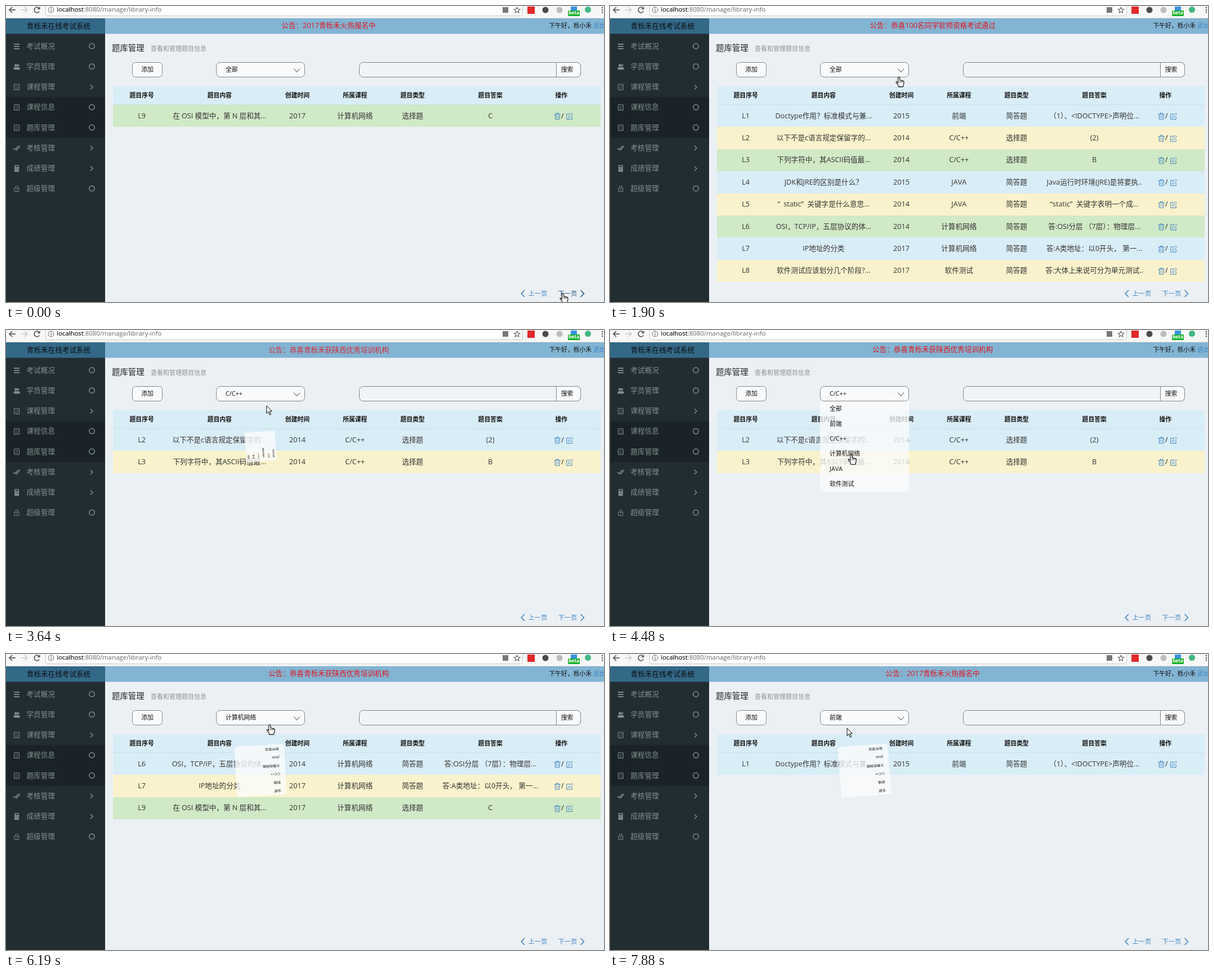
These frames come from a looping animation (1062 px wide and 527 px high, 8000 ms). An HTML page with a canvas:

```html
<!DOCTYPE html>
<html lang="zh-CN">
<head>
<meta charset="utf-8">
<title>题库管理</title>
<style>
html, body { margin: 0; width: 100%; height: 100%; overflow: hidden; background: #ebf0f4; }
canvas { display: block; width: 1062px; height: 527px; }
</style>
</head>
<body>
<canvas id="stage" width="1062" height="527"></canvas>
<script>
const ctx = document.getElementById('stage').getContext('2d');
const LOOP = 8000;
const FONT = '"Open Sans", "Noto Sans CJK JP", "Noto Sans CJK SC", sans-serif';
const BLUE = '#3f83c1', HOVER = '#23527c', PANEL = '#f8fafb', BORDER = '#858585', MENU_INK = '#82908f';
const SIDEBAR = 176, TABLE = { x: 190, y: 143, w: 866, head: 33, row: 39.4 };
const SELECT = { x: 373, y: 100, w: 158, h: 27 };
const LIST = { x: 373, y: 127, w: 158, h: 161 };
const PAGER = { x: 913, y: 504, w: 115, h: 16 };

const COLUMNS = [
  ['题目序号', 102.3], ['题目内容', 174], ['创建时间', 102.3], ['所属课程', 102.3],
  ['题目类型', 102.3], ['题目答案', 174], ['操作', 78]
];
const QUESTIONS = [
  ['L1', 'Doctype作用？标准模式与兼...', '2015', '前端', '简答题', '（1）、<!DOCTYPE>声明位...'],
  ['L2', '以下不是c语言规定保留字的...', '2014', 'C/C++', '选择题', '(2)'],
  ['L3', '下列字符中，其ASCII码值最...', '2014', 'C/C++', '选择题', 'B'],
  ['L4', 'JDK和JRE的区别是什么？', '2015', 'JAVA', '简答题', 'Java运行时环境(JRE)是将要执..'],
  ['L5', '”  static”  关键字是什么意思...', '2014', 'JAVA', '简答题', '“static”  关键字表明一个成...'],
  ['L6', 'OSI，TCP/IP，五层协议的体...', '2014', '计算机网络', '简答题', '答:OSI分层 （7层）：物理层...'],
  ['L7', 'IP地址的分类', '2017', '计算机网络', '简答题', '答:A类地址：以0开头， 第一...'],
  ['L8', '软件测试应该划分几个阶段?...', '2017', '软件测试', '简答题', '答:大体上来说可分为单元测试..'],
  ['L9', '在 OSI 模型中，第 N 层和其...', '2017', '计算机网络', '选择题', 'C']
];
const PAGE_SIZE = 8;
const ROW_COLORS = ['#d9edf7', '#faf2cc', '#d0e9c6'];
const OPTIONS = ['全部', '前端', 'C/C++', '计算机网络', 'JAVA', '软件测试'];
const MENU = [
  ['考试概况', 'bars'], ['学员管理', 'people'], ['课程管理', 'list', true], ['课程信息', 'list'],
  ['题库管理', 'list'], ['考核管理', 'checks', true], ['成绩管理', 'calculator', true], ['超级管理', 'lock']
];
const NOTICES = ['公告：2017青栎禾火热报名中', '公告：恭喜100名同学软师资格考试通过', '公告：恭喜青栎禾获陕西优秀培训机构'];
const NOTICE_PERIOD = 3195, NOTICE_LEAD = 3055;

// Each round clicks the select, then picks an option from the list.
const PAGE_BACK = 850;
const ROUNDS = [
  { open: 2200, from: [510, 124], pick: 2980, option: 2, x: 416 },
  { open: 3567, from: [468, 120], pick: 4580, option: 3, x: 428 },
  { open: 6057, from: [493, 110], pick: 6960, option: 1, x: 403 },
  { open: 7746, from: [410, 118], pick: 8700, option: 1, x: 450 }
];
const optionY = i => 141 + i * 26.75;

// Pointer moves: departure, arrival, destination.
const MOVES = [
  [0, 1, [989, 512]],
  [150, 570, [924, 517]],
  ...ROUNDS.flatMap((round, i) => [
    [i ? ROUNDS[i - 1].pick : PAGE_BACK, round.open - 200, round.from],
    [round.open, round.pick, [round.x, optionY(round.option) + 2]]
  ])
];

const easeOut = p => 1 - (1 - Math.min(1, Math.max(0, p))) ** 2;
const inside = (x, y, r) => x > r.x && x < r.x + r.w && y >= r.y && y < r.y + r.h;

function text(str, x, y, size, color = '#222', align = 'left', weight = '') {
  ctx.font = `${weight} ${size}px ${FONT}`;
  ctx.fontKerning = 'none';
  ctx.fillStyle = color;
  ctx.textAlign = align;
  ctx.textBaseline = 'middle';
  ctx.fillText(str, x, y);
}
function rect(x, y, w, h, color) {
  ctx.fillStyle = color;
  ctx.fillRect(x, y, w, h);
}
function finish(stroke, fill, width = 1) {
  if (fill) { ctx.fillStyle = fill; ctx.fill(); }
  if (stroke) { ctx.strokeStyle = stroke; ctx.lineWidth = width; ctx.stroke(); }
}
function line(points, stroke, width, fill) {
  ctx.beginPath();
  points.forEach(([x, y]) => ctx.lineTo(x, y));
  if (fill) ctx.closePath();
  finish(stroke, fill, width);
}
function circle(x, y, r, stroke, fill, width) {
  ctx.beginPath();
  ctx.arc(x, y, r, 0, Math.PI * 2);
  finish(stroke, fill, width);
}
function box(x, y, w, h, r, stroke, fill) {
  ctx.beginPath();
  ctx.roundRect(x, y, w, h, r);
  finish(stroke, fill);
}
function chevron(x, y, dir, size, color, width) {
  const back = x - dir * size / 2;
  line([[back, y - size], [back + dir * size, y], [back, y + size]], color, width);
}
function at(x, y, draw) {
  ctx.save();
  ctx.translate(x, y);
  draw();
  ctx.restore();
}

function drawBrowserBar() {
  rect(0, 0, 1062, 22, '#f7f7f7');
  box(70.5, -6, 847, 23.5, 3, '#c4c4c4', '#fff');
  rect(0, 21, 1062, 1, '#dcdcdc');
  for (const [x, dir, color] of [[11, 1, '#555'], [33, -1, '#ccc']]) {
    line([[x - 5 * dir, 7], [x + 6 * dir, 7]], color, 1.7);
    line([[x, 2], [x - 5 * dir, 7], [x, 12]], color, 1.7);
  }
  ctx.beginPath();
  ctx.arc(55, 7, 4.8, 0.5, 5.5);
  finish('#555', null, 1.7);
  line([[60.5, 1], [60.5, 6], [55.5, 6]], null, 1, '#555');
  circle(80, 7, 5, '#666');
  line([[80, 6], [80, 10]], '#666', 1.3);
  line([[80, 3.6], [80, 5]], '#666', 1.3);
  text('localhost:8080/manage/library-info', 90, 7, 11.4, '#666');
  text('localhost', 90, 7, 11.4, '#222');
  rect(882, 2, 10, 10, '#777');
  line(Array.from({ length: 11 }, (_, i) => {
    const a = i * Math.PI / 5 - Math.PI / 2, r = i % 2 ? 2.4 : 5.5;
    return [907.5 + r * Math.cos(a), 7.5 + r * Math.sin(a)];
  }), '#555', 1.1);
  rect(926, 1, 13, 13, '#e0292b');
  circle(958, 7, 5.5, null, '#4a4a4a');
  circle(983, 7, 5.5, null, '#bdbdbd');
  rect(1003, 1, 11, 8, '#3793e0');
  box(998, 8, 21, 10, 1, null, '#16b02c');
  text('beta', 1008.5, 12.7, 8.5, '#fff', 'center', 'bold');
  circle(1033.5, 6.5, 5.5, null, '#41b883');
  for (const y of [3, 7, 11]) circle(1059, y, 1.3, null, '#555');
}

const ICONS = {
  bars() { for (const y of [-4, 0, 4]) line([[-5, y], [5, y]], MENU_INK, 1.8); },
  people() {
    for (const [x, s] of [[2.5, 0.8], [-1.5, 1]]) {
      circle(x, -2.5, 2.4 * s, null, MENU_INK);
      box(x - 4 * s, 0.5, 8 * s, 4.5, [3, 3, 0, 0], null, MENU_INK);
    }
  },
  list() {
    box(-4.5, -5, 9, 10, 0.5, MENU_INK);
    for (const y of [-2, 0.5, 3]) line([[-2.8, y], [2.8, y]], MENU_INK, 0.6);
  },
  checks() {
    line([[-6, 0], [-3, 3], [3, -4]], MENU_INK, 1.4);
    line([[-1.5, 2], [0, 3.5], [6, -4]], MENU_INK, 1.4);
  },
  calculator() {
    box(-4, -6, 8, 12, 1, null, MENU_INK);
    rect(-2.5, -4.5, 5, 2, '#222d32');
    for (let i = 0; i < 6; i++) rect(-2.5 + i % 3 * 2, -0.5 + (i / 3 | 0) * 2.5, 1, 1, '#222d32');
  },
  lock() {
    box(-4, -1, 8, 6, 0.5, MENU_INK);
    ctx.beginPath();
    ctx.arc(0, -2.5, 2.5, Math.PI, 0);
    ctx.lineTo(2.5, -1);
    finish(MENU_INK);
    rect(-0.5, 1, 1, 2, MENU_INK);
  }
};

function drawSidebar() {
  rect(0, 22, SIDEBAR, 505, '#222d32');
  rect(0, 22, SIDEBAR, 27.5, '#336887');
  rect(0, 162.5, SIDEBAR, 72.5, '#1a2327');
  text('青栎禾在线考试系统', 93.5, 36.5, 12.6, '#0b0f12', 'center');
  MENU.forEach(([label, icon, expands], i) => {
    const y = 72 + i * 36.2;
    at(19, y, ICONS[icon]);
    text(label, 36.5, y + 0.5, 12.6, MENU_INK);
    if (expands) chevron(152, y, 1, 4, MENU_INK, 1.4);
    else circle(152.5, y - 0.5, 4.7, MENU_INK, null, 1.5);
  });
}

function drawHeader(t) {
  rect(SIDEBAR, 22, 886, 27.5, '#82b4d3');
  const turn = (t + NOTICE_LEAD) / NOTICE_PERIOD;
  const shown = easeOut(turn % 1 * NOTICE_PERIOD / 500);
  ctx.save();
  ctx.beginPath();
  ctx.rect(SIDEBAR, 22, 886, 27.5);
  ctx.clip();
  ctx.globalAlpha = shown;
  text(NOTICES[Math.floor(turn) % NOTICES.length], 573, 35.3 + 12 * (1 - shown), 12.6, '#e3141c', 'center');
  ctx.restore();
  text('下午好，栎小禾', 964.5, 36.5, 10.8, '#111');
  text('退出', 1043, 36.5, 10.8, BLUE);
}

function drawControls(filter) {
  text('题库管理', 188, 76.3, 14.4, '#222');
  text('查看和管理题目信息', 257, 77.3, 11, '#8d9194');
  box(224.5, 100.5, 53, 26, 6, BORDER, PANEL);
  text('添加', 251, 114, 10.8, '#111', 'center');
  box(SELECT.x + 0.5, SELECT.y + 0.5, SELECT.w - 1, SELECT.h - 1, 7, BORDER, PANEL);
  text(filter, 390, 114, 10.8, '#111');
  line([[511, 111.5], [516.5, 117.5], [522, 111.5]], '#666', 1.1);
  box(627.5, 100.5, 393, 26, 7, BORDER, '#f1f4f7');
  box(977.5, 100.5, 43, 26, [0, 7, 7, 0], BORDER, PANEL);
  text('搜索', 996.5, 114, 10.8, '#111', 'center');
}

function drawActions(x, y) {
  at(x - 7, y, () => {
    line([[-5.5, -3.5], [5.5, -3.5]], BLUE);
    line([[-2, -3.5], [-2, -5.5], [2, -5.5], [2, -3.5]], BLUE);
    line([[-4, -3.5], [-3.7, 5.5], [3.7, 5.5], [4, -3.5]], BLUE);
    for (const dx of [-1.5, 1.5]) line([[dx, -1.5], [dx, 3.5]], BLUE, 0.8);
  });
  text('/', x + 2, y, 12.6, '#222', 'center');
  at(x + 14.5, y + 0.5, () => {
    line([[1, -4.5], [-5, -4.5], [-5, 5], [4.5, 5], [4.5, 0]], BLUE);
    line([[-2, 2], [-1.5, -0.5], [4, -6], [6, -4], [0.5, 1.5]], BLUE, 0.9, 'rgba(255,255,255,0.3)');
  });
}

function drawTable(t, filter) {
  const first = t < PAGE_BACK ? PAGE_SIZE : 0;
  const matches = QUESTIONS.filter(q => filter === OPTIONS[0] || q[3] === filter);
  const rows = matches.slice(first, first + PAGE_SIZE);
  const body = TABLE.y + TABLE.head;
  const edge = i => Math.round(body + i * TABLE.row);
  rect(TABLE.x, TABLE.y, TABLE.w, TABLE.head, ROW_COLORS[0]);
  rows.forEach((_, i) => {
    rect(TABLE.x, edge(i), TABLE.w, edge(i + 1) - edge(i), ROW_COLORS[(first + i) % ROW_COLORS.length]);
  });
  rect(TABLE.x, body - 1, TABLE.w, 1, '#d0dfe6');
  let left = TABLE.x;
  COLUMNS.forEach(([head, width], c) => {
    const x = left + width / 2;
    left += width;
    text(head, x, 160.3, 10.8, '#111', 'center', 'bold');
    rows.forEach((row, i) => {
      const y = body + 20.3 + i * TABLE.row;
      if (c < row.length) text(row[c], x, y, 12.6, '#333', 'center');
      else drawActions(x, y);
    });
  });
}

function drawPager(x, y) {
  const hovered = inside(x, y, PAGER);
  const prev = hovered && x < 970 ? HOVER : BLUE;
  const next = hovered && x >= 970 ? HOVER : BLUE;
  chevron(918, 512, -1, 6, prev, 1.5);
  text('上一页', 927.5, 513.3, 11.2, prev);
  text('下一页', 980.5, 513.3, 11.2, next);
  chevron(1023.5, 512, 1, 6, next, 1.5);
}

function openness(t) {
  const round = ROUNDS.findLast(r => r.open <= t);
  return round ? Math.min(easeOut((t - round.open) / 400), 1 - easeOut((t - round.pick) / 400)) : 0;
}

function drawDropdown(scale) {
  if (scale <= 0) return;
  const cx = LIST.x + LIST.w / 2, cy = LIST.y + LIST.h / 2;
  at(cx, cy, () => {
    ctx.rotate((1 - scale) * 400 * Math.PI / 180);
    ctx.scale(scale, scale);
    box(-LIST.w / 2, -LIST.h / 2, LIST.w, LIST.h, [0, 0, 8, 8], null, 'rgba(252,253,253,0.77)');
    OPTIONS.forEach((option, i) => text(option, 390 - cx, optionY(i) - cy, 10.8, '#111'));
  });
}

function pointerAt(t) {
  const i = MOVES.findLastIndex(([depart]) => depart <= t);
  const [depart, arrive, [x1, y1]] = MOVES[i];
  const [x0, y0] = MOVES[Math.max(0, i - 1)][2];
  const k = easeOut((t - depart) / (arrive - depart));
  return [x0 + (x1 - x0) * k, y0 + (y1 - y0) * k];
}

function drawPointer(x, y, scale) {
  const hand = inside(x, y, SELECT) || inside(x, y, PAGER) || scale > 0.9 && inside(x, y, LIST);
  at(x, y, () => {
    if (hand) {
      line([[-1.5, 0.5], [0, -0.5], [1.5, 0.5], [1.8, 5], [8, 6.5], [9, 8], [8.5, 12.5], [7, 17],
        [-0.5, 17], [-1.5, 13.5], [-5, 9.5], [-4.5, 7.8], [-3.5, 7.8], [-1.5, 10]], '#000', 1.1, '#fff');
      for (const dx of [1.8, 4.2, 6.5]) line([[dx, 6], [dx, 9.5]], '#000', 0.8);
    } else {
      line([[0.5, 0.5], [0.5, 14], [3.7, 11], [6, 16.5], [8.2, 15.6], [5.8, 10.2], [10, 10]], '#000', 1, '#fff');
    }
  });
}

function frame(t) {
  const picked = ROUNDS.findLast(r => r.pick <= t);
  const filter = OPTIONS[picked ? picked.option : 0];
  const scale = openness(t);
  const [x, y] = pointerAt(t);
  rect(0, 0, 1062, 527, '#ebf0f4');
  drawBrowserBar();
  drawSidebar();
  drawHeader(t);
  drawControls(filter);
  drawTable(t, filter);
  drawPager(x, y);
  drawDropdown(scale);
  drawPointer(x, y, scale);
}

const began = performance.now();
function loop() {
  frame((performance.now() - began) % LOOP);
  requestAnimationFrame(loop);
}
loop();
</script>
</body>
</html>
```
